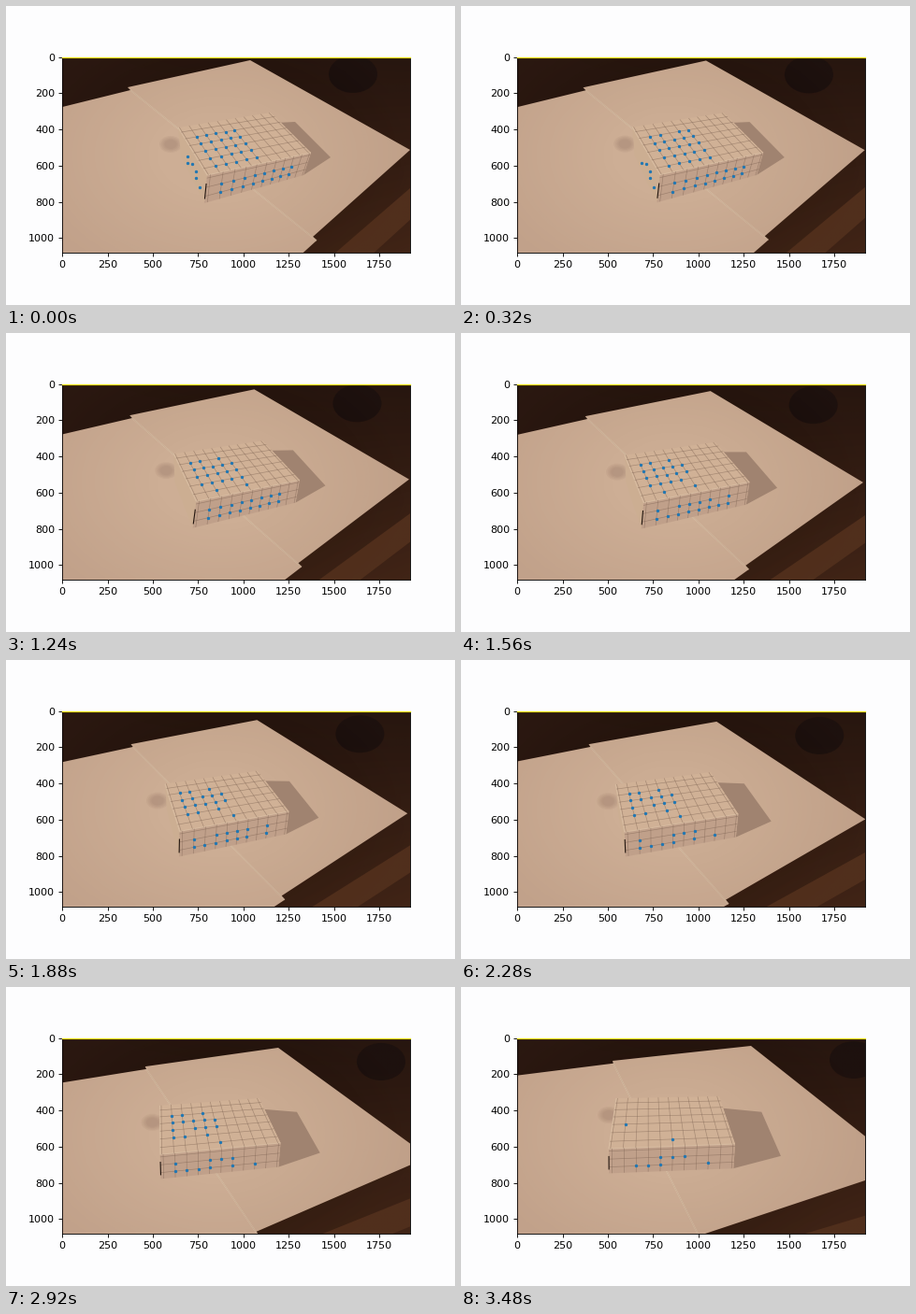
These frames come from a looping animation (480 px wide and 320 px high, 3520 ms). A matplotlib script:

```python
import numpy as np
import matplotlib.pyplot as plt
from matplotlib.animation import FuncAnimation
from matplotlib.collections import LineCollection
from matplotlib.patches import Ellipse, Polygon

FRAMES, STEP = 88, 40
W, H = 1920, 1080
SCALE = 372 / W                 # stage pixels per photo pixel
ORIGIN = np.array([60, 54.575])

# Stage corners of two rigid planes at four evenly spaced moments;
# everything else follows from the perspective they span.
SHEET = np.array([
    [(130, 87), (261, 58), (432, 154), (328, 247)],
    [(132, 88), (265, 60), (431, 156), (314, 246)],
    [(137, 90), (274, 66), (433, 171), (282, 257)],
    [(162, 79), (310, 63), (474, 193), (255, 266)]], float)
LID = np.array([
    [(184, 130), (283, 114), (326, 157), (215, 181)],
    [(180, 129), (275, 115), (315, 157), (205, 180)],
    [(165, 133), (267, 120), (296, 165), (174, 184)],
    [(166, 119), (276, 117), (293, 168), (158, 173)]], float)

# places on the table plane, as seen in the opening view
NEAR_EDGE = [(20, 118), (133, 90), (332, 251), (310, 271)]
BASE = [(187, 160), (318, 181), (212, 211)]
SHADOW = [(309, 124), (347, 162)]
PLANK = [(335, 279), (470, 162), (480, 185), (365, 290)]

# grid cells (row, column): those lost early, in order, and those kept to the end
TOP_LOST, TOP_KEPT = "02 04 40 42 43 34 32 41 21".split(), "20 44".split()
FRONT_LOST, FRONT_KEPT = "01 06 16 02 07 14".split(), "03 04 05 11 12 13 17".split()
SIDE = [(194, 161), (203, 184), (207, 194.5), (194, 168), (199, 169), (203, 177)]


def glide(keys, f):
    """Smooth curve through evenly spaced key poses."""
    slope = np.gradient(keys, axis=0)
    s = f / (FRAMES - 1) * (len(keys) - 1)
    i = min(int(s), len(keys) - 2)
    t = s - i
    return ((1 + 2 * t) * (1 - t) ** 2 * keys[i] + t * (1 - t) ** 2 * slope[i]
            + t * t * (3 - 2 * t) * keys[i + 1] + t * t * (t - 1) * slope[i + 1])


def projection(quad):
    """Perspective matrix from the unit square to a quad."""
    a, b, c, d = np.asarray(quad)
    g, h = np.linalg.solve(np.column_stack([b - c, d - c]), a - b + c - d)
    m = np.column_stack([b - a + g * b, d - a + h * d, a])
    return np.vstack([m, [g, h, 1]])


def place(m, pts):
    p = np.column_stack([np.reshape(pts, (-1, 2)), np.ones(np.size(pts) // 2)]) @ m.T
    return p[:, :2] / p[:, 2:]


def photo(pts):
    return (np.asarray(pts, float) - ORIGIN) / SCALE - 0.5


def lifetimes(rows, cols, lost, kept, first, gap, rng):
    """Frame at which the dot of each grid cell vanishes."""
    ends = rng.uniform(75, 86, (rows, cols))
    for i, (r, c) in enumerate(lost):
        ends[int(r), int(c)] = first + gap * i
    for r, c in kept:
        ends[int(r), int(c)] = FRAMES
    return ends.ravel()


def lattice(us, vs):
    return np.stack(np.meshgrid(us, vs), -1).reshape(-1, 2)


def rulings(us, vs):
    return [[(u, 0), (u, 1)] for u in us] + [[(0, v), (1, v)] for v in vs]


rng = np.random.default_rng(4)
top_uv = lattice(0.109 + 0.0966 * np.arange(5), 0.268 + 0.153 * np.arange(5))
top_end = lifetimes(5, 5, TOP_LOST, TOP_KEPT, 5.5, 5.9, rng)
front_uv = lattice(0.12 + 0.096 * np.arange(8), [0.42, 0.74])
front_end = lifetimes(2, 8, FRONT_LOST, FRONT_KEPT, 33, 4.7, rng)
side_end = 5 + 5 * np.arange(len(SIDE))
top_rules = rulings(0.0124 + 0.0966 * np.arange(11), 0.115 + 0.153 * np.arange(6))
front_rules = rulings(0.024 + 0.096 * np.arange(11), [0.1, 0.42, 0.74])

fig, ax = plt.subplots(figsize=(6, 4), dpi=80, facecolor="#fdfdfe")
fig.subplots_adjust(left=0.125, right=0.9, bottom=0.125, top=0.88)
extent = (-0.5, W - 0.5, H - 0.5, -0.5)

# dark table, a little warmer towards the lower right
yy, xx = np.mgrid[0:1:34j, 0:1:60j]
warm = np.clip(0.15 + 0.9 * xx * yy - 0.15 * xx, 0, 1)[..., None]
table = (1 - warm) * np.array([30, 16, 10]) + warm * np.array([62, 34, 18])
ax.imshow(table / 255, extent=extent, interpolation="bilinear", zorder=0)

# soft fall-off of light over the sheets
veil = np.zeros((34, 60, 4))
veil[..., :3] = np.array([110, 70, 60]) / 255
veil[..., 3] = np.clip(0.3 * np.hypot(xx - 0.45, (yy - 0.5) * 0.8) - 0.05, 0, 0.12)
ax.imshow(veil, extent=extent, interpolation="bilinear", zorder=3)


def shape(color, z, alpha=1.0):
    return ax.add_patch(Polygon([(0, 0), (0, 1), (1, 0)], facecolor=color, lw=0,
                                alpha=alpha, zorder=z))


def blob(w, h, color, z, alpha):
    return ax.add_patch(Ellipse((0, 0), w / SCALE, h / SCALE, facecolor=color, lw=0,
                                alpha=alpha, zorder=z))


def lines(color, width, z, alpha=1.0):
    return ax.add_collection(LineCollection([], colors=color, linewidths=width,
                                            alpha=alpha, zorder=z), autolim=False)


plank = shape("#4d2c18", 0.5)
clutter = blob(52, 40, "#0e0808", 0.6, 0.7)
back = shape("#cbac93", 1)
near = shape("#cdae95", 2)
seam = lines("#dcc3a8", 1.4, 2.5, 0.7)
shade = shape("#a08370", 4)
smudges = [blob(24 * k, 18 * k, "#806052", 4, 0.08) for k in (1, 0.85, 0.7, 0.55)]
left_face = shape("#ccae92", 5)
front_face = shape("#c0a08a", 5)
top_face = shape("#d0b196", 5)
rim = lines("#dcc2a7", 1, 6, 0.7)
grid = lines("#7a6050", 0.6, 6, 0.5)
corner = lines("#22150f", 1, 7)
marks, = ax.plot([], [], ".", color="#1f77b4", ms=4.2, mew=0.9, zorder=8)

ax.set_xlim(-0.5, W - 0.5)
ax.set_ylim(H - 0.5, -0.5)
ax.set_xticks(range(0, 1800, 250))
ax.set_yticks(range(0, 1001, 200))
ax.spines["top"].set(color="#fbf20a", linewidth=1.1)


def draw(f):
    sheet, lid = glide(SHEET, f), glide(LID, f)
    ground = projection(sheet) @ np.linalg.inv(projection(SHEET[0]))
    bl, br, fr, fl = lid
    low_bl, low_fr, low_fl = place(ground, BASE)
    side = [fl, fr, low_fr, low_fl]
    top_map, side_map = projection(lid), projection(side)

    # table and paper
    edge = place(ground, NEAR_EDGE)
    back.set_xy(photo([*sheet, edge[2], edge[1]]))
    near.set_xy(photo([*edge, (200, 330), (0, 330)]))
    seam.set_segments([photo(edge[1:3])])
    plank.set_xy(photo(place(ground, PLANK)))
    clutter.set_center(photo(sheet[1] + (110, 15)))

    # box
    shade.set_xy(photo([br + 0.25 * (fr - br), *place(ground, SHADOW), low_fr, fr]))
    left_face.set_xy(photo([bl, fl, low_fl, low_bl]))
    front_face.set_xy(photo(side))
    top_face.set_xy(photo(lid))
    rim.set_segments([photo([bl, fl, fr])])
    corner.set_segments([photo([fl + k * (low_fl - fl) for k in (0.3, 0.85)])])
    grid.set_segments([photo(place(top_map, s)) for s in top_rules]
                      + [photo(place(side_map, s)) for s in front_rules])
    for b in smudges:
        b.set_center(photo(bl + (-8, 18)))

    # dots still being followed
    shift = bl - LID[0][0]
    pts = np.vstack([place(top_map, top_uv)[f < top_end],
                     place(side_map, front_uv)[f < front_end],
                     (np.array(SIDE) + shift)[f < side_end]])
    marks.set_data(*photo(pts).T)
    return marks,


anim = FuncAnimation(fig, draw, frames=FRAMES, interval=STEP, repeat=True, repeat_delay=0)
plt.show()
```
